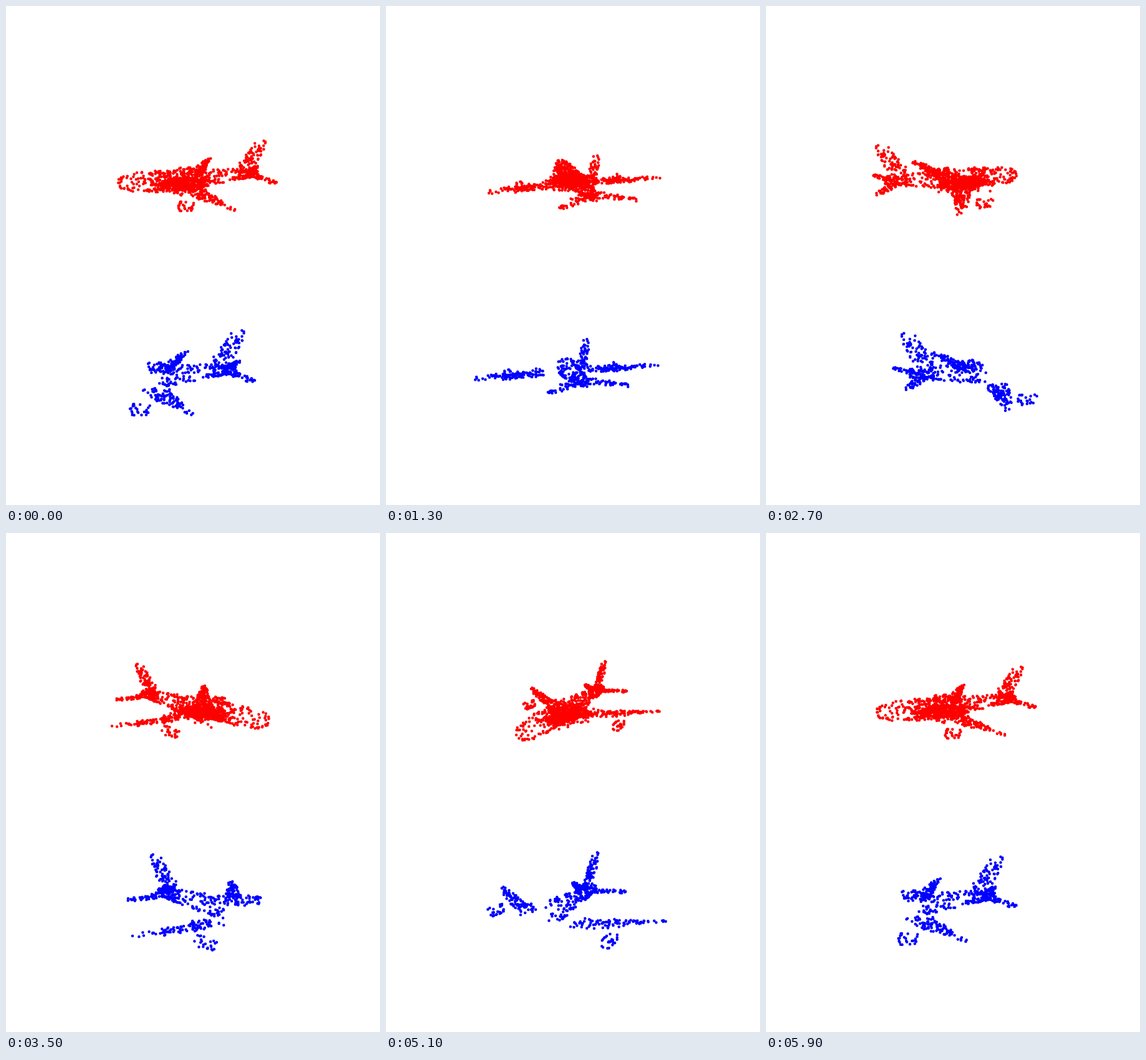
Write an HTML page with a canvas that moves like this. It is 600 px wide and 800 px high and loops after 6 s.

```html
<!DOCTYPE html>
<html lang="en">
<head>
<meta charset="utf-8">
<title>Rotating point cloud</title>
<style>
  html, body { margin: 0; width: 100%; height: 100%; overflow: hidden; background: #fff; }
  canvas { display: block; }
</style>
</head>
<body>
<canvas id="stage" width="600" height="800"></canvas>
<script>
const ctx = document.getElementById('stage').getContext('2d');
const STEP_MS = 100, STEPS = 60, START_ANGLE = -0.045, DOT = 2.25;
const TILT_SIN = 0.3, TILT_COS = 0.954, PERSPECTIVE = 0.325;

let seed = 20417;
function rnd() {
  seed = (Math.imul(seed, 1664525) + 1013904223) >>> 0;
  return seed / 4294967296;
}
const range = (a, b) => a + (b - a) * rnd();
const mix = (a, b, t) => a + (b - a) * t;
const bell = spread => (rnd() + rnd() + rnd() - 1.5) * 2 * spread;

// Model axes: u forward, v to the left wing, w up.
const whole = [], parts = [];
function add(count, make, isPart) {
  for (let i = 0; i < count; i++) {
    const p = make();
    whole.push(p);
    if (isPart) parts.push(p);
  }
}

function hull(u) {
  const t = Math.max(0, -u / 0.93);
  const radius = u > 0 ? 0.135 * Math.sqrt(1 - u ** 8) : 0.126 - 0.095 * t ** 1.5;
  const middle = u > 0 ? -0.01 - 0.045 * u : -0.01 + 0.08 * t;
  const a = range(0, 2 * Math.PI), r = radius * range(0.8, 1.02);
  return [u, r * 0.9 * Math.cos(a), middle + r * Math.sin(a)];
}

// Dense along most of the span, with only a few points near the tip.
function wing(side) {
  const r = rnd(), t = 0.8 * r + 0.2 * r ** 12, v = 0.27 + 0.82 * t;
  const u = range(0.17 - 0.48 * t, -0.13 - 0.24 * t);
  return [u, side * v, -0.07 + 0.09 * v * v + range(-0.015, 0.015)];
}

function engine(side) {
  const a = range(0, 2 * Math.PI);
  return [range(0, 0.19), side * (0.7 + 0.04 * Math.cos(a)), -0.09 + 0.05 * Math.sin(a)];
}

function tailplane(side) {
  const t = rnd() ** 1.15;
  return [range(-0.61 - 0.33 * t, -0.86 - 0.15 * t), side * (0.04 + 0.34 * t),
    0.045 + range(-0.012, 0.012)];
}

function fin() {
  const t = rnd();
  return [range(mix(-0.56, -0.82, t), mix(-0.82, -0.97, t)), range(-0.018, 0.018),
    mix(0.13, 0.495, t)];
}

add(115, () => hull(0.2 + 0.79 * rnd() ** 1.1));
add(75, () => hull(range(0, 0.55)));
add(400, () => [0.15 + bell(0.17), bell(0.12), -0.08 + bell(0.033)]);
add(110, () => hull(range(-0.65, -0.01)), true);
add(55, () => hull(range(-0.88, -0.6)), true);
add(68, fin, true);
for (const side of [-1, 1]) {
  add(26, () => [range(-0.15, 0.24), side * range(0.1, 0.28), -0.075 + bell(0.015)]);
  add(95, () => wing(side), true);
  add(24, () => engine(side), true);
  add(44, () => tailplane(side), true);
}

function drawCloud(points, view, angle) {
  const cos = Math.cos(angle), sin = Math.sin(angle);
  ctx.fillStyle = view.color;
  ctx.beginPath();
  for (const [u0, v, w] of points) {
    const u = u0 + view.shift;
    const across = -u * cos - v * sin;
    const near = v * cos - u * sin;
    const scale = view.scale / (1 - PERSPECTIVE * (near * TILT_COS + w * TILT_SIN));
    const x = 300 + scale * across;
    const y = view.y - scale * (w * TILT_COS - near * TILT_SIN);
    ctx.moveTo(x + DOT, y);
    ctx.arc(x, y, DOT, 0, 2 * Math.PI);
  }
  ctx.fill();
}

const upper = { color: '#f00', y: 276, scale: 120, shift: 0 };
const lower = { color: '#00f', y: 591.5, scale: 144, shift: 0.39 };

function render() {
  const step = Math.floor(performance.now() / STEP_MS) % STEPS;
  const angle = START_ANGLE + step / STEPS * 2 * Math.PI;
  ctx.fillStyle = '#fff';
  ctx.fillRect(0, 0, 600, 800);
  drawCloud(whole, upper, angle);
  drawCloud(parts, lower, angle);
  requestAnimationFrame(render);
}
render();
</script>
</body>
</html>
```
